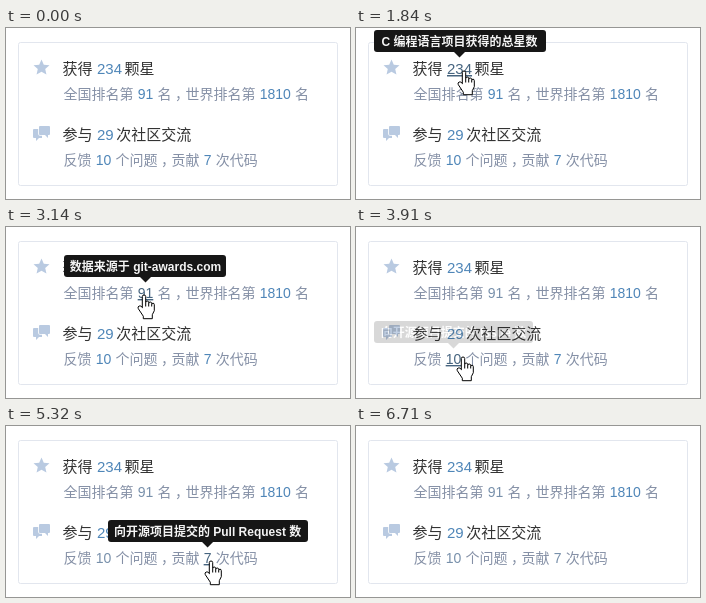
Animation of 344 by 171 pixels, one loop 7.57 s. Source, as an HTML page:

```html
<!DOCTYPE html>
<html lang="zh-CN">
<head>
<meta charset="utf-8">
<style>
html, body { margin: 0; width: 100%; height: 100%; overflow: hidden; background: #fff; }
svg { display: block; width: 344px; height: 171px; font-family: "Liberation Sans", "Noto Sans CJK SC", sans-serif; }
.title { font-size: 15px; fill: #333; }
.note { font-size: 14px; fill: #8590a6; }
.link { fill: #4f86b8; }
.note.used { fill: #7890ab; }
.link.hover { fill: #46647f; text-decoration: underline; }
.icon { fill: #b9cae1; }
.tip { fill: #161616; }
.tip text { font-size: 12px; font-weight: bold; fill: #f4f4f4; text-anchor: middle; }
#cursor path { fill: #fff; stroke: #000; stroke-linejoin: round; }
#cursor .beam { fill: none; }
</style>
</head>
<body>
<svg viewBox="0 0 344 171">
  <rect x="12.5" y="14.5" width="319" height="143" rx="2" fill="#fff" stroke="#e2e6ee"/>
  <polygon id="star" class="icon"/>
  <g class="icon">
    <path d="M28 101h8v9h-3l-3 3v-3h-2q-1 0-1-1v-7q0-1 1-1z"/>
    <path d="M34 98h9q1 0 1 1v7q0 1-1 1h-1v3l-3-3h-5q-1 0-1-1v-7q0-1 1-1z" stroke="#fff" stroke-width="1.6" paint-order="stroke"/>
  </g>
  <g id="texts"></g>
  <g id="tips"></g>
  <g id="cursor">
    <path class="hand" transform="translate(2 .5)" d="M-1.7 13V2Q-1.7 .5 0 .5T1.7 2V8q0-1.500 1.500-1.500t1.500 1.500v1q0-1.500 1.500-1.500t1.500 1.500v1q0-1.300 1.300-1.300t1.300 1.500v6l-2 4v4h-9v-2.500l-5-7.500q-1-2 .8-2.700t3.500 1.700zM1.700 8v4m3-3v3m3-2v2"/>
    <path class="beam" d="M-3-7h2l1.500 1 1.500-1h2M.5-6v13M-3 8h2l1.500-1 1.500 1h2"/>
    <path class="arrow" d="M0 0v16l4-3.500 2.500 5.500 2.300-1-2.400-5.500h5z"/>
  </g>
</svg>
<script>
const LOOP = 7570, STEP = 76.5, FADE = 185;
const $ = id => document.getElementById(id);
const clamp = v => Math.max(0, Math.min(1, v));

function add(parent, name, attrs, content = "") {
  const el = document.createElementNS("http://www.w3.org/2000/svg", name);
  for (const key in attrs) el.setAttribute(key, attrs[key]);
  el.textContent = content;
  return parent.appendChild(el);
}

$("star").setAttribute("points", Array.from({ length: 10 }, (_, i) => {
  const r = i % 2 ? 3.9 : 8.4, a = i * Math.PI / 5;
  return [35.5 + r * Math.sin(a), 39.8 - r * Math.cos(a)];
}).join(" "));

// Lays out a line on an em grid; numbers become links.
const links = {};
function addLine(style, size, x, y, gapAfter, string) {
  for (const part of string.match(/\d+|，|[^\d，]+/g)) {
    const isLink = /\d/.test(part);
    const width = part.length * size * (isLink ? 0.556 : 1);
    if (isLink) x += size * 0.3;
    const shift = part === "，" ? size * 0.25 : 0;
    const el = add($("texts"), "text", { x: x + shift, y, class: style + (isLink ? " link" : "") }, part);
    if (isLink) links[part] = { el, x, y, width, size };
    x += width + (isLink ? size * gapAfter : 0);
  }
}
const addTitle = (y, string) => addLine("title", 15, 56.5, y, 0.17, string);
const addNote = (y, string) => addLine("note", 14, 57.5, y, 0.3, string);
addTitle(46, "获得234颗星");
addNote(71, "全国排名第91名，世界排名第1810名");
addTitle(112, "参与29次社区交流");
addNote(137, "反馈10个问题，贡献7次代码");

// Pointer trips, each ending at x, y; most of them open a tip above a link.
const trips = [
  { start: 760, end: 1300, x: 103, y: 40, link: "234", label: "C 编程语言项目获得的总星数", width: 172 },
  { start: 1840, end: 2600, x: 138, y: 63, link: "91", label: "数据来源于 git-awards.com", width: 162 },
  { start: 3140, end: 4060, x: 105, y: 129, link: "10", label: "向开源项目提交的 Issue 数", width: 159 },
  { start: 4630, end: 5320, x: 203, y: 134, link: "7", label: "向开源项目提交的 Pull Request 数", width: 200 },
  { start: 6260, end: 6710, x: 206, y: 200 }
];
const entry = { x: 124, y: 80 };

function addTip({ link, label, width }) {
  const { x, y, width: linkWidth, size } = links[link];
  const center = x + linkWidth / 2, top = y - size - 29;
  const tip = add($("tips"), "g", { class: "tip" });
  add(tip, "rect", { x: Math.round(center - width / 2), y: top, width, height: 22, rx: 3 });
  add(tip, "path", { d: `M${center - 5.5} ${top + 22}h11l-5.5 5.5z` });
  add(tip, "text", { x: center, y: top + 15.5 }, label);
  return tip;
}
const tips = trips.filter(trip => trip.link).map(trip => ({ ...trip, el: addTip(trip) }));

const ease = p => (p + p * p * (3 - 2 * p)) / 2;

function pointerAt(t, index) {
  const from = trips[index - 1] || entry, to = trips[index];
  const k = ease(clamp((t - to.start + STEP) / (to.end - to.start + STEP) / 0.82));
  return [from.x + (to.x - from.x) * k, from.y + (to.y - from.y) * k];
}

// The screen is refreshed only in steps while a trip lasts.
function snap(t, { start, end }) {
  return t >= end ? end : start + Math.floor((t - start + 5) / STEP) * STEP;
}

function draw(time) {
  const now = time % LOOP;
  const index = trips.filter(trip => trip.start <= now).length - 1;
  const visible = index >= 0;
  const t = visible ? snap(now, trips[index]) : 0;
  const [x, y] = visible ? pointerAt(t, index) : [-50, -50];

  const inLine = base => y > base - 14 && y < base + 5;
  let kind = Object.values(links).some(link => inLine(link.y)) ? "beam" : "arrow";
  for (const link of Object.values(links)) {
    const hover = inLine(link.y) && x >= link.x && x <= link.x + link.width;
    link.el.classList.toggle("hover", hover);
    if (hover) kind = "hand";
  }

  tips.forEach(({ el, end, link }, i) => {
    const close = trips[i + 1].start + 50;
    el.setAttribute("opacity", clamp((t - end + FADE) / FADE) * clamp(1 - (t - close) / 150));
    links[link].el.classList.toggle("used", t > close);
  });

  $("cursor").setAttribute("transform", `translate(${Math.round(x)} ${Math.round(y)})`);
  for (const shape of $("cursor").children)
    shape.style.display = shape.classList.contains(kind) ? "" : "none";
}

const began = performance.now();
(function frame() {
  draw(performance.now() - began);
  requestAnimationFrame(frame);
})();
</script>
</body>
</html>
```
